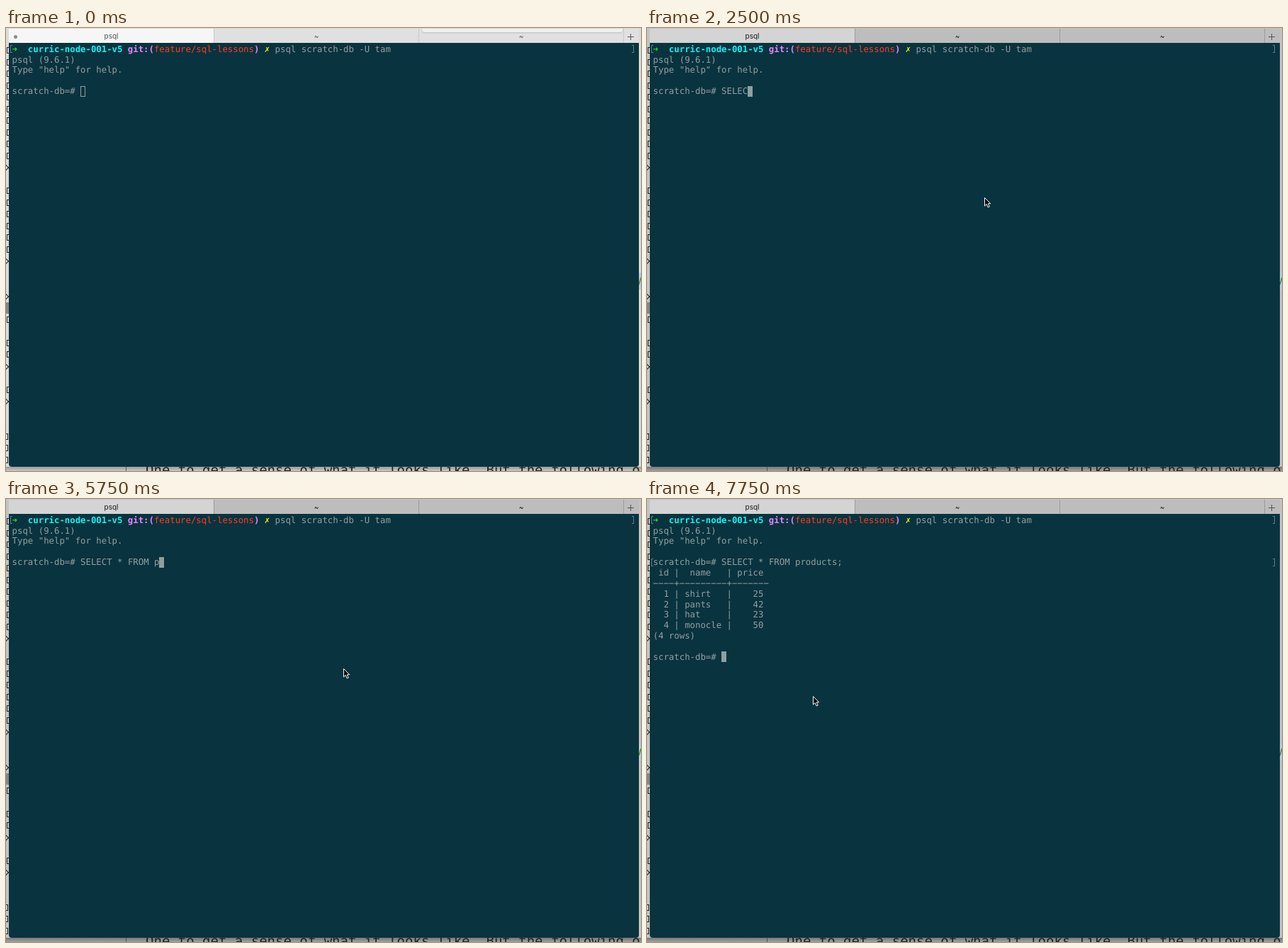
Recreate the animation shown at these times as an HTML page. Size 896 by 625 pixels, loop 8 s.

```html
<!DOCTYPE html>
<html lang="en">
<head>
<meta charset="utf-8">
<title>psql session</title>
<style>
  :root { --cw: 7.42px; --lh: 14.85px; }
  html, body { margin: 0; width: 100%; height: 100%; overflow: hidden; }
  body { position: relative; background: #c3c3c3; --tab: #bdbdbd; --active: #d4d4d4; --line: #9b9b9b; --label: #1c1c1c; }
  body.idle { background: #dadada; --tab: #e0e0e0; --active: #f6f6f6; --line: #c9c9c9; --label: #555; }
  div, span, svg { position: absolute; box-sizing: border-box; }
  .mono { font-family: "DejaVu Sans Mono", monospace; white-space: pre; text-rendering: geometricPrecision; }
  #below { left: 0; top: 619px; width: 896px; height: 6px; background: linear-gradient(#777, #a0a0a0); overflow: hidden; }
  .idle #below { background: linear-gradient(#999, #c8c8c8); }
  #below span { left: 197px; top: -6px; font-size: 19px; line-height: 22px; color: #222; }
  #below div { left: 169px; top: 0; width: 1px; height: 6px; background: #555; }
  .icon { width: 8px; height: 9px; border: 1px solid #222; }
  .caret { left: -3px; width: 6px; height: 6px; border: solid #222; border-width: 1px 1px 0 0; transform: rotate(45deg); }
  #tabs { left: 4px; top: 1px; width: 889px; height: 20px; background: var(--tab); overflow: hidden; }
  .tab { top: 0; height: 20px; width: 290px; border-right: 1px solid var(--line); text-align: center;
    font: 10px/21px Inter, sans-serif; color: var(--label); }
  .tab.on { background: var(--active); }
  #plus { left: 872px; top: 6px; }
  #dot { left: 7px; top: 9px; width: 5px; height: 5px; border-radius: 50%; background: #8a8a8a; }
  #sheet { left: 583px; top: -6px; width: 283px; height: 11px; border-radius: 4px; background: #f0f0f0; box-shadow: 0 1px 2px #bbb; }
  body:not(.idle) :is(#dot, #sheet) { display: none; }
  #term { left: 4px; top: 21px; width: 889px; height: 598px; background: #09333f; border-radius: 0 0 4px 4px; }
  #screen { left: 0; top: 0; font-size: 12.33px; line-height: var(--lh); color: #92a0a0; }
  #cursor { height: 15px; background: #8f9f9f; }
  .idle #cursor { background: none; border: 1px solid #8f9f9f; }
  .mark { width: 3px; height: 11px; border: 1px solid #55808c; }
  .mark.l { left: 6px; border-right: 0; }
  .mark.r { left: 883px; border-left: 0; }
</style>
</head>
<body>
<div id="edge"></div>
<div id="below"><div></div><span class="mono">One to get a sense of what it looks like. But the following o</span></div>
<div style="left:0;top:387px;width:4px;height:16px;background:#858585"></div>
<div style="left:893px;top:345px;width:3px;height:24px;background:#b9cbd6"></div>
<svg style="left:893px;top:350px" width="3" height="13"><path d="M0 12L3 2" stroke="#4c8a2c" stroke-width="1.5"/></svg>
<div id="tabs">
  <div class="tab on" style="left:0">psql</div>
  <div class="tab" style="left:290px;width:289px">~</div>
  <div class="tab" style="left:579px;width:289px">~</div>
  <div id="dot"></div><div id="sheet"></div>
  <svg id="plus" width="11" height="11"><path d="M1 5.5h9M5.5 1v9" stroke="#555"/></svg>
</div>
<div id="term"></div>
<div id="screen" class="mono"></div>
<svg id="mouse" width="14" height="19" viewBox="-1 -1 14 19">
  <path d="M0.5 0.5V12L3.2 9.5L5.2 14L7.2 13.1L5.2 8.8H8.7Z" fill="#000" stroke="#fff" stroke-linejoin="round"/>
</svg>
<script>
const $ = id => document.getElementById(id);
const LOOP = 8000, DONE = 7250;
const LEFT = 8.6, TOP = 22.7, CELL = 7.42, LINE = 14.85;
const PROMPT = 'scratch-db=# ', QUERY = 'SELECT * FROM products;';

// [time, characters typed]
const typing = [[0, 0], [1500, 2], [1750, 4], [2500, 5], [2750, 4], [3000, 5], [3250, 7], [3750, 9],
  [4250, 10], [4500, 12], [4750, 13], [5000, 14], [5750, 15], [6000, 17], [6250, 18], [6500, 21], [6750, 23]];
// [time, x, y]
const pointer = [[0, -50, -50], [250, 516, 126], [750, 475.5, 239], [7500, 404.5, 267], [7750, 234, 278]];

const at = (steps, t) => steps.findLast(s => s[0] <= t);
const add = (parent, cls, style = {}) => {
  const el = document.createElement('div');
  el.className = cls;
  Object.assign(el.style, style);
  return parent.appendChild(el);
};
const rowTop = row => TOP + LINE * row;
const colLeft = col => LEFT + CELL * col;

function print(row, col, text, color, fontWeight = 'normal') {
  const el = add($('screen'), '', { top: rowTop(row) + 'px', left: colLeft(col) + 'px', fontWeight });
  el.textContent = text;
  if (color) el.style.color = color;
  return el;
}
const marks = row => ['l', 'r'].map(side =>
  add($('screen'), 'mark ' + side, { top: Math.floor(rowTop(row)) + 2 + 'px' }));

// Sidebar icons peeking out behind the window
const gaps = [11, 19, 20, 22, 24, 28, 31, 32], carets = [10, 18, 21, 27, 30];
for (let i = 0; i < 36; i++) {
  const y = 32 + 16.5 * i;
  if (carets.includes(i)) add($('edge'), 'caret', { top: y - 3 + 'px' });
  else if (!gaps.includes(i)) add($('edge'), 'icon', { top: y - 5 + 'px', left: i > 32 ? '-5px' : '1px' });
}

print(0, 0, '➜', '#22e322', 'bold');
print(0, 3, 'curric-node-001-v5', '#10f4f4', 'bold');
print(0, 22, 'git:(', '#e983ff', 'bold');
print(0, 27, 'feature/sql-lessons', '#ff3b20');
print(0, 46, ')', '#e983ff', 'bold');
print(0, 48, '✗', '#f5f50a', 'bold');
print(0, 50, 'psql scratch-db -U tam');
print(1, 0, 'psql (9.6.1)');
print(2, 0, 'Type "help" for help.');
marks(0);
const command = print(4, 0, PROMPT);
const rule = [4, 9, 7].map(n => '−'.repeat(n)).join('+');
const output = [
  ' id |  name   | price',
  rule,
  ...[['shirt', 25], ['pants', 42], ['hat', 23], ['monocle', 50]]
    .map(([name, price], i) => `  ${i + 1} | ${name.padEnd(7)} |    ${price}`),
  '(4 rows)', '', PROMPT
].map((line, i) => print(5 + i, 0, line)).concat(marks(4));
const cursor = add($('screen'), '');
cursor.id = 'cursor';

function draw(t) {
  const done = t >= DONE, typed = at(typing, t)[1], [, x, y] = at(pointer, t);
  const col = PROMPT.length + (done ? 0 : typed), left = Math.floor(colLeft(col));
  document.body.className = t < 250 ? 'idle' : '';
  command.textContent = PROMPT + QUERY.slice(0, typed);
  for (const el of output) el.style.visibility = done ? 'visible' : 'hidden';
  cursor.style.top = Math.floor(rowTop(done ? 13 : 4)) + 'px';
  cursor.style.left = left + 'px';
  cursor.style.width = Math.floor(colLeft(col + 1)) - left + 'px';
  $('mouse').style.left = x - 1 + 'px';
  $('mouse').style.top = y - 1 + 'px';
}

const start = performance.now();
function tick() {
  draw((performance.now() - start) % LOOP);
  requestAnimationFrame(tick);
}
tick();
</script>
</body>
</html>
```
